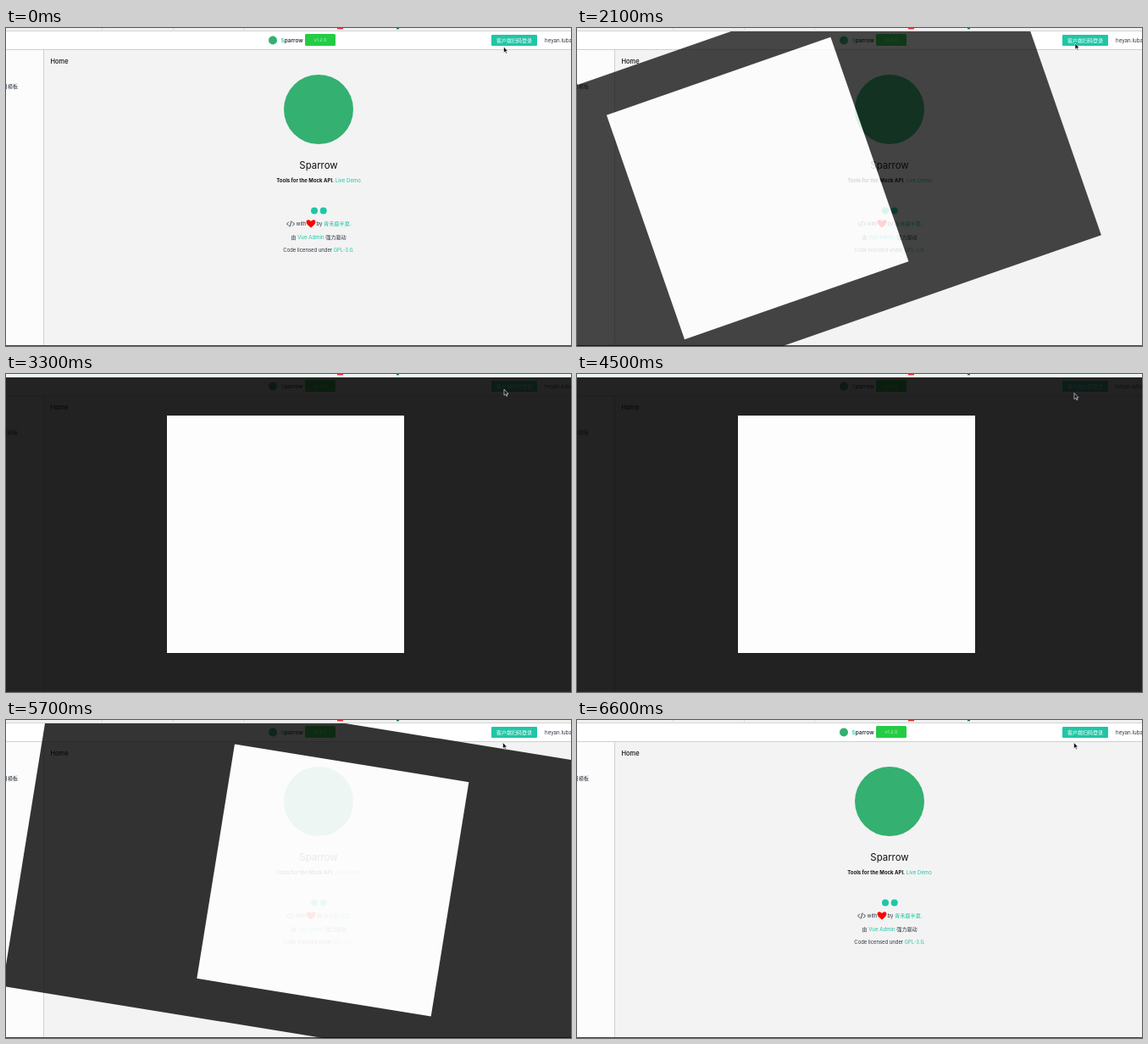
These frames come from a looping animation (667x375 px, 7800 ms). An HTML page:

```html
<!DOCTYPE html>
<html lang="zh">
<head>
<meta charset="utf-8">
<style>
  html, body { margin: 0; width: 100%; height: 100%; overflow: hidden; background: #f3f3f3; }
  svg { display: block; width: 667px; height: 375px; }
  text { font: 6px Inter, "Noto Sans CJK SC", "Noto Sans CJK", sans-serif; fill: #2b3440; }
  .mid { text-anchor: middle; }
  .link { fill: #1fc6a6; }
  .bold { font-weight: 700; fill: #111; }
</style>
</head>
<body>
<svg viewBox="0 0 667 375">
  <defs><clipPath id="viewport"><rect y="4" width="667" height="371"/></clipPath></defs>

  <rect width="667" height="375" fill="#f3f3f3"/>
  <rect y="4" width="667" height="21" fill="#fff"/>
  <rect y="26" width="44" height="348" fill="#fcfcfc"/>
  <path d="M0 25.5H667M44.5 26V374" stroke="#d0d0d0"/>

  <!-- header -->
  <circle cx="315" cy="14.5" r="5" fill="#34b071"/>
  <text x="324.5" y="17" style="font-size:6.4px;font-weight:600"><tspan class="link">S</tspan>parrow ·</text>
  <rect x="353" y="7" width="36" height="14" rx="1.5" fill="#24cc45"/>
  <text class="mid" x="371" y="16" style="font-size:5.4px;fill:#b5f0c0">v1.2.0</text>
  <rect id="button" x="573" y="8" width="54" height="13" rx="1"/>
  <text class="mid" x="600" y="16.8" style="fill:#fff">客户端扫码登录</text>
  <text x="636" y="17" style="font-size:6.2px">heyan.lubai</text>

  <!-- page -->
  <text x="14" y="70.5" text-anchor="end">项目模板</text>
  <text x="52.5" y="42" style="font-size:7.5px;font-weight:500;fill:#111">Home</text>
  <circle cx="369" cy="96" r="41" fill="#34b071"/>
  <text class="mid" x="369" y="166" style="font-size:11.4px;fill:#111">Sparrow</text>
  <text class="mid" x="369" y="181.5"><tspan class="bold">Tools for the Mock API.</tspan> <tspan class="link">Live Demo</tspan></text>
  <g class="link"><circle cx="364" cy="215.5" r="4"/><circle cx="374.7" cy="215.5" r="4"/></g>
  <path d="M334 228.5L331.5 231L334 233.5M338 228.5L340.5 231L338 233.5M337 227.5L335 234.5" fill="none" stroke="#2b3440" stroke-width=".9"/>
  <text x="342.5" y="233">with</text>
  <path d="M360 235.5C350 229 356 223.500 360 228C364 223.500 370 229 360 235.500Z" fill="#f00"/>
  <text x="366.5" y="233">by</text>
  <text x="375" y="233" style="font-size:6.2px"><tspan class="link">青禾鹿半夏</tspan>.</text>
  <text class="mid" x="369" y="248.500" style="font-size:6.1px">由 <tspan class="link">Vue Admin</tspan> 强力驱动</text>
  <text class="mid" x="369" y="263.500" style="font-size:5.9px">Code licensed under <tspan class="link">GPL-3.0</tspan>.</text>
  <path d="M0 374.500H667" stroke="#444"/>

  <g clip-path="url(#viewport)">
    <g id="modal">
      <rect x="-35" y="4" width="730" height="370.500" fill="#080808" fill-opacity=".89"/>
      <rect x="190" y="49" width="280" height="280" fill="#fdfdfd"/>
    </g>
  </g>

  <!-- browser edge -->
  <rect id="strip" width="667" height="4"/>
  <path id="edge" d="M0 3.500H667M113.500 0V2M197.500 0V2M280.500 0V2" stroke="#d4d4d4"/>
  <rect x="391" width="7" height="1.300" fill="#e8232a"/>
  <rect x="461" width="3" height="1.300" fill="#15704a"/>
  <rect id="bar" y="2.500" height="2" fill="#22c065"/>

  <path id="arrow" d="M0 0V7.200L1.700 5.700L2.900 8.200L4 7.700L2.900 5.300H5Z" fill="#111" stroke="#fff" stroke-width=".6"/>
  <path id="hand" d="M0 0.500Q1-.5 1.700 .8V3L5 3.700Q5.600 4 5.300 5.500L4.600 7.700H1L-1.600 4.700Q-1.500 3.600 0 4.500Z" fill="#fff" stroke="#222" stroke-width=".7"/>
</svg>
<script>
  const LOOP = 7800, STEP = 300, WIDTH = 730;
  const el = id => document.getElementById(id);
  const set = (id, attrs) => Object.entries(attrs).forEach(([k, v]) => el(id).setAttribute(k, v));
  const show = (id, on) => set(id, { visibility: on ? 'visible' : 'hidden' });

  // Each track lists [start, value]; the last one reached holds.
  const at = (track, t) => track.findLast(([start]) => start <= t)[1];
  const roll = [[0, -1], [2100, -.16], [2400, -.0375], [2700, 0], [5700, .0765], [6000, 1]];
  const pointer = [[0, [587.5, 22]], [600, [587, 16]], [900, [588, 18]], [4500, [587, 22.500]], [4800, [586.5, 26.500]]];
  const fill = [[0, '#1fc6a6'], [600, '#2fcbad'], [1500, '#1cbb9c'], [2100, '#1fc6a6']];
  const load = [[0, 0], [2400, 304], [2700, 560], [3000, 667], [3300, 0]];

  function draw(now) {
    const t = Math.floor(now % LOOP / STEP) * STEP;
    const r = at(roll, t), [x, y] = at(pointer, t);
    set('modal', {
      transform: `translate(${WIDTH * r} 0) rotate(${120 * r} 330 189)`,
      opacity: 1 - Math.abs(r)
    });
    set('button', { fill: at(fill, t) });
    set('bar', { width: at(load, t) });
    const loaded = t >= 3000 && t < 5700;
    set('strip', { fill: loaded ? '#eefaf4' : '#f1f1f1' });
    show('edge', !loaded);
    const hover = t >= 600 && t < 2100;
    show('hand', hover);
    show('arrow', !hover);
    set(hover ? 'hand' : 'arrow', { transform: `translate(${x} ${y})` });
    requestAnimationFrame(() => draw(performance.now()));
  }
  draw(performance.now());
</script>
</body>
</html>
```
